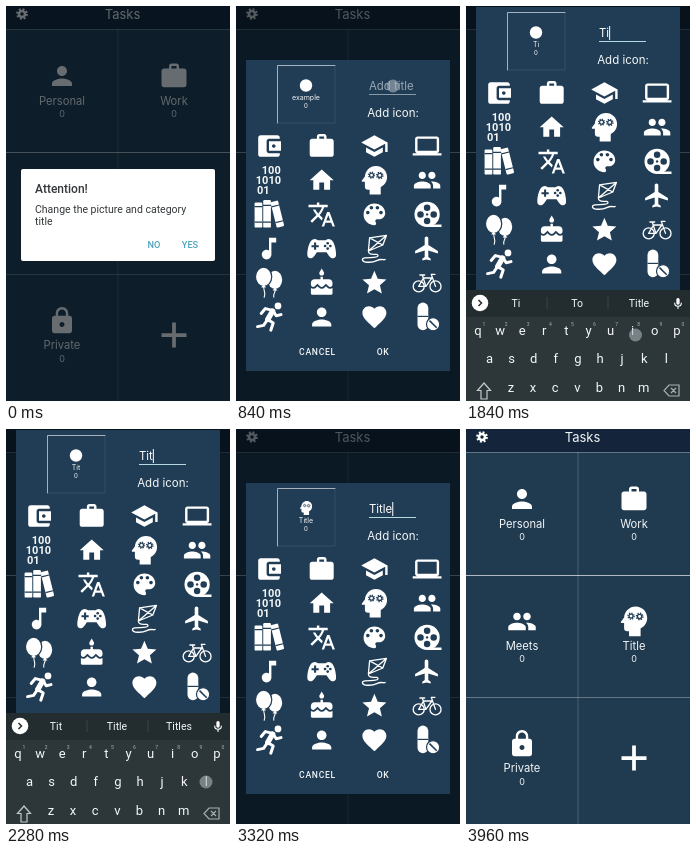
Recreate the animation shown at these times as an HTML page. Size 224 by 395 pixels, loop 4000 ms.

```html
<!DOCTYPE html>
<html lang="en">
<head>
<meta charset="utf-8">
<title>Tasks</title>
<style>
html, body { margin: 0; height: 100%; overflow: hidden; background: #203a50 }
svg { display: block; width: 100vw; height: 100vh; --panel: #213d55 }
text { font-family: Inter, sans-serif; fill: #f4f7f8 }
.mid { text-anchor: middle }
.ui { font-family: Roboto, sans-serif }
.bold { font-weight: 500 }
.line { fill: none; stroke: #fff; stroke-linecap: round; stroke-linejoin: round }
.cut { fill: var(--panel) }
.cutline { fill: none; stroke: var(--panel) }
.edge { stroke: var(--panel) }
.dark { fill: #34383a }
.teal { fill: #4aa3bb }
.grey { fill: #aab0b2 }
.sketch { fill: none; stroke: #aab0b2; stroke-width: 1.2 }
.caps .key { text-transform: uppercase }
</style>
</head>
<body>
<svg id="stage" viewBox="0 0 224 395" fill="#fff"></svg>
<script>
const path = (d, attrs = '') => `<path d="${d}" ${attrs}/>`;
const line = (d, width = 1) => path(d, `class="line" stroke-width="${width}"`);
const cutLine = (d, width = 1) => path(d, `class="cutline" stroke-width="${width}"`);
const rect = (x, y, w, h, attrs = '') => `<rect x="${x}" y="${y}" width="${w}" height="${h}" ${attrs}/>`;
const circle = (x, y, r, attrs = '') => `<circle cx="${x}" cy="${y}" r="${r}" ${attrs}/>`;
const circles = (points, r, attrs) => points.map(([x, y]) => circle(x, y, r, attrs)).join('');
const text = (x, y, size, content, cls = '', attrs = '') =>
  `<text x="${x}" y="${y}" font-size="${size}" class="${cls}" ${attrs}>${content}</text>`;
const gear = (x, y, r, color, weight = .55) => {
  const ring = `fill="none" style="stroke:${color}" stroke-width="${r * weight}"`;
  return circle(x, y, r * .65, ring) + circle(x, y, r, `${ring} stroke-dasharray="${Math.PI * r / 8}"`);
};

// Icons live in a 24 unit box.
const icons = {
  wallet: path('M21 18v1c0 1.1-.9 2-2 2H5c-1.1 0-2-.9-2-2V5c0-1.1.9-2 2-2h14c1.1 0 2 .9 2 2v1h-9c-1.1 0-2 .9-2 2v8c0 1.1.9 2 2 2h9zm-9-2h10V8H12v8zm4-2.5c-.83 0-1.5-.67-1.5-1.5s.67-1.5 1.5-1.5 1.5.67 1.5 1.5-.67 1.5-1.5 1.5z'),
  work: path('M20 6h-4V4c0-1.1-.9-2-2-2h-4c-1.1 0-2 .9-2 2v2H4c-1.1 0-2 .9-2 2v11c0 1.1.9 2 2 2h16c1.1 0 2-.9 2-2V8c0-1.1-.9-2-2-2zm-6 0h-4V4h4v2z'),
  school: path('M5 13.2v4L12 21l7-3.8v-4L12 17l-7-3.8zM12 3L1 9l11 6 9-4.9V17h2V9L12 3z'),
  laptop: path('M20 18c1.1 0 2-.9 2-2V6c0-1.1-.9-2-2-2H4c-1.1 0-2 .9-2 2v10c0 1.1.9 2 2 2H0v2h24v-2h-4zM4 6h16v10H4V6z'),
  binary: ['100', '1010', '01'].map((row, i) => text([6, 1, 2][i], 7 + 8.4 * i, 9.2, row, 'ui', 'font-weight="700"')).join(''),
  home: path('M10 20v-6h4v6h5v-8h3L12 3 2 12h3v8z'),
  head: '<g transform="translate(12 12) scale(1.32) translate(-12 -12)">' +
    path('M13 3C9.2 3 6.2 6 6 9.7L4.1 12.2c-.2.3 0 .8.4.8H6v3a2 2 0 0 0 2 2h1v3h7v-4.7c2.4-1.1 4-3.5 4-6.3 0-3.9-3.1-7-7-7') +
    gear(10.2, 8.8, 1.9, 'var(--panel)', .4) + gear(15.4, 9, 2, 'var(--panel)', .4) + '</g>',
  group: path('M16 11c1.66 0 3-1.34 3-3s-1.34-3-3-3-3 1.34-3 3 1.34 3 3 3zm-8 0c1.66 0 3-1.34 3-3S9.66 5 8 5 5 6.34 5 8s1.34 3 3 3zm0 2c-2.33 0-7 1.17-7 3.5V19h14v-2.5c0-2.33-4.67-3.5-7-3.5zm8 0l-1 .05c1.16.84 2 1.97 2 3.45V19h6v-2.5c0-2.33-4.67-3.5-7-3.5z'),
  books: rect(0, 2, 6.4, 21, 'rx="1"') + rect(7.2, 0, 6.4, 23, 'rx="1"') + cutLine('M0 5.5h6.4M0 18.5h6.4M7 4.5h6.6M7 18.5h6.6') +
    '<g transform="rotate(-14 18 12)">' + rect(15.8, 1, 6.4, 22, 'rx="1"') + cutLine('M15.800 5h6.4M15.8 18.500h6.4') + '</g>',
  translate: path('M12.87 15.07l-2.54-2.51c1.74-1.94 3-4.2 3.74-6.56H17V4h-7V2H8v2H1v2h11.17C11.5 7.92 10.44 9.75 9 11.35 8.07 10.32 7.3 9.19 6.69 8h-2c.73 1.63 1.73 3.17 2.98 4.56l-5.09 5.02L4 19l5-5 3.11 3.11.76-2.04zM18.5 10h-2L12 22h2l1.12-3h4.75L21 22h2l-4.5-12zm-2.62 7l1.62-4.33L19.12 17h-3.24z'),
  palette: path('M12 3a9 9 0 0 0 0 18c1.3 0 1.9-1.5 1.1-2.5-.9-1-.1-2.5 1.1-2.5H16c2.8 0 5-2.2 5-5 0-4.4-4-8-9-8z') +
    circles([[6.5, 10.5], [9.5, 6.5], [14.5, 6.5], [17.5, 10.5]], 1.5, 'class="cut"'),
  reel: circle(12, 12, 10.5) + path('M12 22.5h12v-2h-7z') +
    circles([[12, 6.5], [12, 17.5], [6.5, 12], [17.5, 12]], 2.7, 'class="cut"') + circle(12, 12, 1, 'class="cut"'),
  note: path('M12 3v10.5c-.6-.3-1.3-.5-2-.5-2.2 0-4 1.8-4 4s1.8 4 4 4 4-1.8 4-4V7h4V3h-6z'),
  gamepad: path('M6 4c2 0 2 1 3 1h6c1 0 1-1 3-1 4 0 6 8 6 13 0 4-4 4-6 1l-2-3H8l-2 3c-2 3-6 3-6-1C0 12 2 4 6 4z') +
    cutLine('M6.5 7v6M3.5 10h6', 1.7) + circles([[17, 7.5], [17, 12], [14.8, 9.8], [19.2, 9.8]], 1.1, 'class="cut"'),
  kite: line('M8 3 22 1 19 9 7 14zM8 3l11 6M22 1 7 14c0 5 8 1 8 4s-13 0-13 3 8 3 12 1 6 0 7-1', 1.1),
  plane: path('M21 16v-2l-8-5V3.5c0-.8-.7-1.5-1.5-1.5S10 2.7 10 3.5V9l-8 5v2l8-2.5V19l-2 1.5V22l3.5-1 3.5 1v-1.5L13 19v-5.5l8 2.5z'),
  balloons: line('M17 17c1 3-2 4-1 7M8 14c-2 3 2 5 0 10', .9) +
    '<ellipse cx="17" cy="9.5" rx="6" ry="7.5"/><ellipse cx="7.5" cy="7" rx="6.8" ry="8" class="edge"/>' +
    path('M7.5 13l2 3h-4zM17 16l2 2.5h-4z'),
  cake: path('M12 6c1.1 0 2-.9 2-2 0-.4-.1-.7-.3-1L12 0l-1.7 3c-.2.3-.3.6-.3 1 0 1.1.9 2 2 2zm4.6 10l-1.1-1.1-1 1.1c-1.3 1.3-3.600 1.3-4.900 0l-1.1-1.1L7.4 16c-1.2 1.2-3 1.3-4.4.4V21c0 .5.5 1 1 1h16c.5 0 1-.5 1-1v-4.600c-1.400.9-3.2.8-4.4-.4zM18 9h-5V7h-2v2H6c-1.7 0-3 1.3-3 3v1.5c0 1.7 2.1 2.6 3.3 1.4l2.2-2.1 2.1 2.1c.7.7 2 .7 2.8 0l2.100-2.1 2.2 2.1c1.2 1.2 3.3.3 3.3-1.4V12c0-1.7-1.3-3-3-3z'),
  star: path('M12 17.3L18.2 21l-1.600-7L22 9.2l-7.2-.6L12 2 9.2 8.600 2 9.2l5.5 4.800L5.8 21z'),
  bike: circles([[5, 15], [19, 15]], 4.6, 'class="line" stroke-width="1.1"') +
    line('M5 15l4-7h7l-5 7zL11 15 8 5.5H6h4M19 15 15.5 5h3', 1.1),
  runner: circle(19.5, 2.8, 2.8) + line('M15 7l-4 7', 4.5) +
    line('M15 6.5 9 5 5.5 9M15.5 7l2.5 4 4-1M11 14l4.5 3-2 6M10.5 14.5 7.5 19l-5 1', 2.5),
  person: path('M12 12c2.2 0 4-1.8 4-4s-1.8-4-4-4-4 1.8-4 4 1.8 4 4 4zm0 2c-2.7 0-8 1.3-8 4v2h16v-2c0-2.7-5.3-4-8-4z'),
  heart: path('M12 21.35l-1.45-1.32C5.4 15.36 2 12.28 2 8.5 2 5.42 4.42 3 7.5 3c1.74 0 3.41.81 4.5 2.09C13.09 3.81 14.76 3 16.5 3 19.58 3 22 5.42 22 8.5c0 3.78-3.4 6.86-8.55 11.54z'),
  pills: rect(4, 0, 9, 23, 'rx="4.5"') + cutLine('M4 11.5h9') +
    circle(17, 18, 5.5, 'class="edge"') + cutLine('M14 15l6 6', 1.3),
  lock: path('M18 8h-1V6c0-2.8-2.2-5-5-5S7 3.2 7 6v2H6c-1.1 0-2 .9-2 2v10c0 1.1.9 2 2 2h12c1.1 0 2-.9 2-2V10c0-1.1-.9-2-2-2zm-6 9c-1.1 0-2-.9-2-2s.9-2 2-2 2 .9 2 2-.9 2-2 2zm3.1-9H8.9V6c0-1.7 1.4-3.1 3.1-3.1s3.1 1.4 3.1 3.1v2z'),
  plus: path('M12 2v20M2 12h20', 'stroke="#fff" stroke-width="3"'),
  mic: rect(9, 3, 6, 12, 'rx="3"') + line('M6 12c0 8 12 8 12 0M12 18v4', 2)
};
const icon = (name, x, y, scale) =>
  `<g transform="translate(${x} ${y}) scale(${scale}) translate(-12 -12)">${icons[name]}</g>`;

const tile = (name, label, col, row) => {
  const x = 56 + 112 * col, y = 70 + 122.4 * row;
  return icon(name, x, y, 1.25) + text(x, y + 28.5, 11.2, label, 'mid') + text(x, y + 41, 9, '0', 'mid');
};
const tasks = rect(0, 0, 224, 23, 'fill="#14253b"') +
  path('M112 23v372', 'stroke="#fff" stroke-opacity=".2"') +
  path('M0 23.5h224M0 268.5h224', 'stroke="#fff" stroke-opacity=".3"') +
  path('M0 146.5h224', 'stroke="#fff" stroke-opacity=".65"') +
  gear(16, 8, 4.6, '#fff') + text(116.5, 12.8, 13, 'Tasks', 'mid') +
  tile('person', 'Personal', 0, 0) + tile('work', 'Work', 1, 0) + tile('group', 'Meets', 0, 1) +
  tile('head', 'Title', 1, 1) + tile('lock', 'Private', 0, 2) + icon('plus', 168, 329, 1.25);

const alertBox = rect(15, 163, 194, 92, 'rx="2"') +
  text(29, 187.2, 12, 'Attention!', 'ui bold dark') +
  text(29, 206.8, 10.5, 'Change the picture and category', 'ui dark') +
  text(29, 219, 10.5, 'title', 'ui dark') +
  text(148, 242.3, 9.2, 'NO', 'ui bold mid teal') + text(184, 242.3, 9.2, 'YES', 'ui bold mid teal');

const choices = ['wallet', 'work', 'school', 'laptop', 'binary', 'home', 'head', 'group',
  'books', 'translate', 'palette', 'reel', 'note', 'gamepad', 'kite', 'plane',
  'balloons', 'cake', 'star', 'bike', 'runner', 'person', 'heart', 'pills'];
const pickerBox = rect(10, 54, 204, 311, 'class="cut"') +
  path('M41.5 117V59.5H99', 'class="line" stroke-opacity=".6"') +
  path('M99 60v57H42', 'class="line" stroke-opacity=".08"') +
  `<g id="dot">${circle(70, 79.5, 6.2)}</g><g id="chosen">${icon('head', 70, 79, .58)}</g>` +
  text(70, 93.5, 7, '', 'mid', 'id="sample"') + text(70, 101.5, 6, '0', 'mid') +
  text(133, 84, 11.4, '', '', 'id="field"') + rect(133, 88, 47, 1, 'id="rule"') + rect(0, 73, 1, 14, 'id="caret"') +
  text(157, 111, 11.5, 'Add icon:', 'mid') +
  choices.map((name, i) => icon(name, 33 + 52.7 * (i % 4), 140 + 34.2 * (i >> 2), 1.2)).join('') +
  text(81.5, 349.2, 8.6, 'CANCEL', 'ui bold mid', 'letter-spacing=".7"') +
  text(147, 349.2, 8.6, 'OK', 'ui bold mid', 'letter-spacing=".5"');

const keyRow = (letters, x, y) => [...letters].map((c, i) => text(x + 22.1 * i, y, 13, c, 'ui mid key')).join('');
const keyboardBox = rect(0, 284, 224, 111, 'fill="#2d3739"') + rect(0, 284, 224, 27, 'fill="#232d30"') +
  circle(14, 297, 8.3) + path('', 'id="chevron" fill="none" stroke="#232d30" stroke-width="1.5"') +
  '<g id="tools">' + path('M39 292h9v6l-3 4h-6zM48 298h-3v4M41 296h1M45 296h1', 'class="sketch"') +
  text(76, 300, 8.5, 'GIF', 'ui mid grey', 'font-weight="700"') +
  path('M104 293h8v9h-8zM106 292h4M106 296h4M106 299h4', 'class="sketch"') +
  gear(140, 297, 4, '#aab0b2') + circles([[176, 297], [180, 297], [184, 297]], 1, 'class="grey"') + '</g>' +
  '<g id="hints">' + [50, 111, 173].map(x => text(x, 300.8, 10.5, '', 'ui mid hint')).join('') +
  path('M81 291v12M142 291v12', 'stroke="#fff" stroke-opacity=".1"') + '</g>' +
  icon('mic', 212, 297, .55) +
  keyRow('qwertyuiop', 12, 329) + keyRow('asdfghjkl', 23.5, 357) + keyRow('zxcvbnm', 45, 386) +
  [...'1234567890'].map((c, i) => text(18 + 22.1 * i, 320, 5, c, 'ui mid grey')).join('') +
  path('M18 377l6.5 7.500H21v8.500h-6v-8.500h-3.5z', 'id="shift" stroke="#c3c8ca" stroke-width="1.2"') +
  path('M203 379h10v11h-10l-5-5.5zM205 382l5 5M210 382l-5 5', 'class="sketch"');

const $ = id => document.getElementById(id);
$('stage').innerHTML = tasks + rect(0, 0, 224, 395, 'id="shade" style="fill:#000a10"') +
  `<g id="alert">${alertBox}</g><g id="picker">${pickerBox}</g><g id="keyboard">${keyboardBox}</g>` +
  circle(0, 0, 6.5, 'id="touch" fill="#a9b4bc"');

const keyTimes = [1480, 1780, 2080, 2320, 2580];
const hintSets = [['', '', ''], ['T', 'To', 'The'], ['Ti', 'To', 'Title'], ['Tit', 'Title', 'Titles'],
  ['Titl', 'Title', 'Titles'], ['Title', 'Titles', 'Entitled']];
// Each touch: start, x, y
const touches = [[210, 184, 239], [720, 157, 80], [1420, 100, 326], [1740, 169.5, 329], [2040, 100, 326],
  [2270, 200, 353], [2470, 55, 326], [3080, 138, 174], [3500, 147, 346]];
const touchLife = 230, focusTime = 900, hideTime = 2840, pickTime = 3160;

const ramp = (t, start, length) => Math.min(1, Math.max(0, (t - start) / length));
const easeOut = p => 1 - (1 - p) ** 3;
const show = (id, on) => $(id).setAttribute('opacity', +on);

function draw(t) {
  const alertOn = 1 - ramp(t, 240, 80);
  const pickerOn = ramp(t, 240, 80) - ramp(t, 3580, 100);
  const hide = ramp(t, hideTime, 160);
  const lift = easeOut(ramp(t, focusTime, 180)) - hide;
  const slide = easeOut(ramp(t, focusTime, 300)) - hide;
  show('shade', .6 * alertOn + .67 * pickerOn);
  show('alert', alertOn);
  show('picker', pickerOn);
  $('picker').setAttribute('transform', `translate(0 ${-53 * lift})`);
  $('keyboard').setAttribute('transform', `translate(0 ${111 * (1 - slide)})`);

  const count = keyTimes.filter(k => t >= k).length;
  const typed = 'Title'.slice(0, count);
  const focused = t >= focusTime;
  $('sample').textContent = typed || 'example';
  $('field').textContent = typed || 'Add title';
  $('field').style.fill = typed ? '#fff' : '#9aa8b3';
  $('rule').setAttribute('fill', focused ? '#b4dbe0' : '#8a9aa8');
  const lastInput = count ? keyTimes[count - 1] : focusTime;
  show('caret', focused && (t - lastInput) % 560 < 280);
  $('caret').setAttribute('x', 133 + (typed ? $('field').getComputedTextLength() : 0));
  show('dot', t < pickTime);
  show('chosen', t >= pickTime);

  $('keyboard').classList.toggle('caps', !count);
  $('shift').setAttribute('fill', count ? 'none' : '#c3c8ca');
  $('chevron').setAttribute('d', count ? 'M12.5 294l3 3-3 3' : 'M15.5 294l-3 3 3 3');
  show('tools', !count);
  show('hints', count > 0);
  document.querySelectorAll('.hint').forEach((hint, i) => hint.textContent = hintSets[count][i]);

  const touch = touches.find(([start]) => t >= start && t < start + touchLife);
  show('touch', 0);
  if (touch) {
    const [start, x, y] = touch;
    $('touch').setAttribute('transform', `translate(${x} ${y})`);
    show('touch', .6 * Math.min(1, (start + touchLife - t) / 100));
  }
}

function frame() {
  draw(performance.now() % 4000);
  requestAnimationFrame(frame);
}
frame();
</script>
</body>
</html>
```
